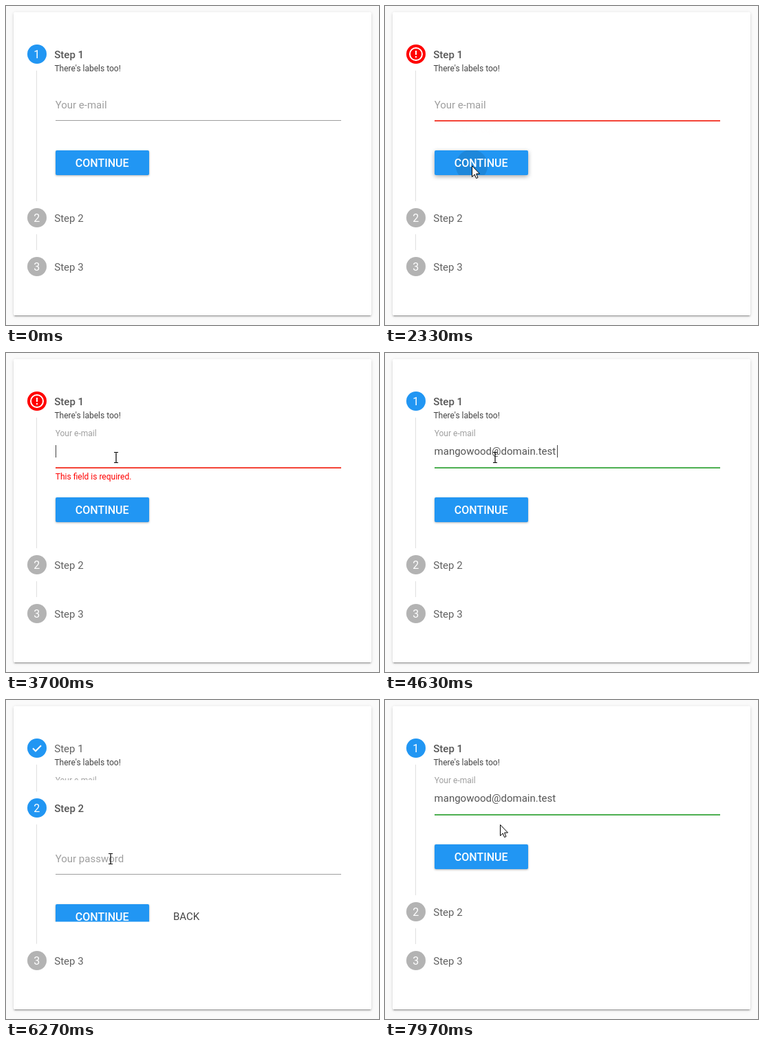
These frames come from a looping animation (542x464 px, 8 s). An HTML page:

```html
<!DOCTYPE html>
<html lang="en">
<head>
<meta charset="utf-8">
<title>Stepper form</title>
<style>
  html, body { margin: 0; width: 100%; height: 100%; overflow: hidden; background: #fafafa; }
  .card {
    position: absolute; left: 11px; top: 9px; width: 520px; height: 441px;
    background: #fff; border-radius: 2px;
    box-shadow: 0 2px 2px rgba(0,0,0,.14), 0 3px 1px -2px rgba(0,0,0,.2), 0 1px 5px rgba(0,0,0,.12);
  }
  svg { position: absolute; left: 0; top: 0; font: 15px Roboto, sans-serif; }
  .title { fill: #616161; }
  .title.on { fill: #555; font-weight: 500; }
  .num { fill: #fff; font-size: 16px; text-anchor: middle; }
  .small { font-size: 12px; }
  .hint { fill: #9e9e9e; }
  .value { fill: #555; }
  .btn { fill: #2196f3; }
  .caption { fill: #fff; font-size: 16px; font-weight: 500; text-anchor: middle; }
  .back { fill: #444; text-anchor: middle; }
  .white { fill: none; stroke: #fff; stroke-width: 2; }
</style>
</head>
<body>
<div class="card"></div>
<svg id="stage" width="542" height="464" viewBox="0 0 542 464"></svg>
<script>
const LOOP = 8000;
const BLUE = '#2196f3', GREY = '#b3b3b3', RED = '#f00';
const $ = id => document.getElementById(id);
const set = (id, attrs) => { for (const k in attrs) $(id).setAttribute(k, attrs[k]); };
const show = (id, on) => set(id, { opacity: +on });

const step = (n, sub, content) => `
  <g id="step${n}">
    <rect id="line${n}" x="44" y="94" width="1" height="23" fill="#e0e0e0" ${n > 2 ? 'opacity="0"' : ''}/>
    <circle id="dot${n}" cx="45" cy="70" r="14" fill="${GREY}"/>
    <text id="num${n}" class="num" x="44.7" y="75.5">${n}</text>
    <text id="title${n}" class="title" x="70.3" y="76">Step ${n}</text>
    ${sub}
    ${content && `<clipPath id="clip${n}"><rect id="clipBox${n}" x="60" y="97" width="440" height="173"/></clipPath>
    <g id="body${n}" clip-path="url(#clip${n})">${content}</g>`}
  </g>`;

const field = (n, label) => `
  <text id="label${n}" class="hint" x="71.7" y="149">${label}</text>
  <rect id="under${n}" x="72" y="166" width="415" height="1" fill="#9e9e9e"/>`;

const button = n => `
  <rect id="btn${n}" class="btn" x="72" y="210" width="136" height="36" rx="2"/>
  <g clip-path="url(#btnClip)"><circle id="ripple${n}" r="0"/></g>
  <text class="caption" x="139.7" y="233.5">CONTINUE</text>`;

$('stage').innerHTML = `
  <clipPath id="btnClip"><rect x="72" y="210" width="136" height="36" rx="2"/></clipPath>
  <clipPath id="backClip"><rect x="213" y="210" width="98" height="36" rx="2"/></clipPath>` +
  step(1, `
    <g id="alert" class="white"><circle cx="45" cy="70" r="9"/><path d="M45 65v6M45 73v2"/></g>
    <path id="check" class="white" d="M39 70.3l4 4 8-8"/>
    <text class="small" x="70.4" y="95" fill="#444">There's labels too!</text>`,
    field(1, 'Your e-mail') + `
    <text id="error" class="small" x="71.8" y="184" fill="${RED}">This field is required.</text>
    <text id="mail" class="value" x="71.6" y="148">mangowood@domain.test</text>
    <rect id="caret" y="134" width="1" height="18" fill="#444"/>` + button(1)) +
  step(2, '', field(2, 'Your password') + button(2) + `
    <rect id="hover" x="213" y="210" width="98" height="36" rx="2" fill-opacity=".1"/>
    <g clip-path="url(#backClip)"><circle id="ripple3" r="0"/></g>
    <text class="back" x="262" y="233">BACK</text>`) +
  step(3, '', '') + `
  <g id="cursor">
    <path id="arrow" d="M.5.5V16.5L4.2 13 6.6 18.6 9 17.6 6.6 12H11.5Z" fill="#fff" stroke="#000"/>
    <path id="beam" d="M-3-7.5h2.5l.5.5.5-.5H3M0-7V7M-3 7.5h2.5l.5-.5.5.5H3" fill="none" stroke="#000" stroke-width="1.2"/>
  </g>`;

set('step3', { transform: 'translate(0 309)' });

// time, x, y of the pointer
const path = [
  [570, 486, 253], [970, 300, 190], [1370, 109, 114], [1470, 109, 106], [1570, 107, 107],
  [1700, 109, 122], [2070, 126, 232], [2480, 126, 232], [2800, 199, 199], [3030, 177, 224],
  [3070, 176, 235], [3210, 120, 364], [3320, 41, 330], [3480, 158, 152], [3600, 160, 152],
  [4640, 160, 152], [5100, 152, 235], [5170, 152, 231], [6340, 152, 231], [6900, 248, 294],
  [7320, 248, 294], [7530, 184, 198], [7730, 184, 198], [7970, 167, 181]
];

const ramp = (t, start, length) => Math.min(1, Math.max(0, (t - start) / length));
const ease = (t, start, length) => { const u = ramp(t, start, length); return u * u * (3 - 2 * u); };
const within = (t, a, b) => t >= a && t < b;

function pointer(t) {
  const i = path.findIndex(k => k[0] > t);
  if (i < 0) return path[path.length - 1].slice(1);
  if (!i) return path[0].slice(1);
  const [a, x, y] = path[i - 1], [b, x2, y2] = path[i];
  const u = ease(t, a, b - a);
  return [x + (x2 - x) * u, y + (y2 - y) * u];
}

function ripple(id, t, start, x, y) {
  const age = t - start;
  set(id, { cx: x, cy: y, r: Math.max(0, Math.min(150, age * .23)), opacity: .1 * (1 - ramp(age, 300, 500)) });
}

function openStep(n, open) {
  set('line' + n, { height: 23 + 167 * open });
  set('clipBox' + n, { height: open === 1 ? 173 : 5 + 148 * open });
  set('body' + n, { visibility: open ? 'visible' : 'hidden' });
  set('title' + n, { class: open > .5 ? 'title on' : 'title' });
}

function draw(t) {
  const p = ease(t, 6029, 300) - ease(t, 7041, 300);
  const shift = 238 - 167 * p;
  const second = within(t, 6029, 7041);
  const invalid = within(t, 2330, 4370);
  const filled = t >= 4370;

  openStep(1, 1 - p);
  openStep(2, p);
  set('step2', { transform: `translate(0 ${Math.round(shift)})` });

  set('dot1', { fill: invalid ? RED : BLUE });
  set('dot2', { fill: second ? BLUE : GREY });
  show('num1', !invalid && !second);
  show('alert', invalid);
  show('check', second);

  const up = ease(t, 3500, 200);
  set('label1', { y: 149 - 28 * up });
  $('label1').style.fontSize = 15 - 3 * up + 'px';
  set('under1', { height: t < 2330 ? 1 : 2, fill: filled ? '#4caf50' : invalid ? '#f44336' : '#9e9e9e' });
  set('error', { opacity: ramp(t, 2330, 200) - ramp(t, 4370, 200) });
  show('mail', filled);
  set('caret', { x: filled ? 250 : 72 });
  show('caret', within(t, 3500, 3970) || within(t, 4370, 4870) || within(t, 5400, 5900));

  const lift = ease(t, 2230, 200) - ease(t, 2880, 150) + ease(t, 5900, 120) - ease(t, 6030, 150);
  $('btn1').style.filter = `drop-shadow(0 ${1 + 3 * lift}px ${1.5 + 3 * lift}px rgba(0,0,0,${.3 + .1 * lift}))`;
  $('btn2').style.filter = 'drop-shadow(0 1px 1.5px rgba(0,0,0,.3))';
  if (t < 5900) ripple('ripple1', t, 2230, 126, 232);
  else ripple('ripple1', t, 5900, 152, 231);
  ripple('ripple3', t, 6990, 248, 223);

  const [x, y] = pointer(t);
  const top = p > .5 ? shift : 0;
  const inField = x > 72 && x < 487 && y > top + 131 && y < top + 167;
  show('hover', p > 0 && x > 213 && x < 311 && y > shift + 205 && y < shift + 246);
  show('cursor', t >= 570);
  set('cursor', { transform: `translate(${Math.round(x)} ${Math.round(y)})` });
  show('arrow', !inField);
  show('beam', inField);
}

const begin = performance.now();
function tick() {
  draw((performance.now() - begin) % LOOP);
  requestAnimationFrame(tick);
}
tick();
</script>
</body>
</html>
```
